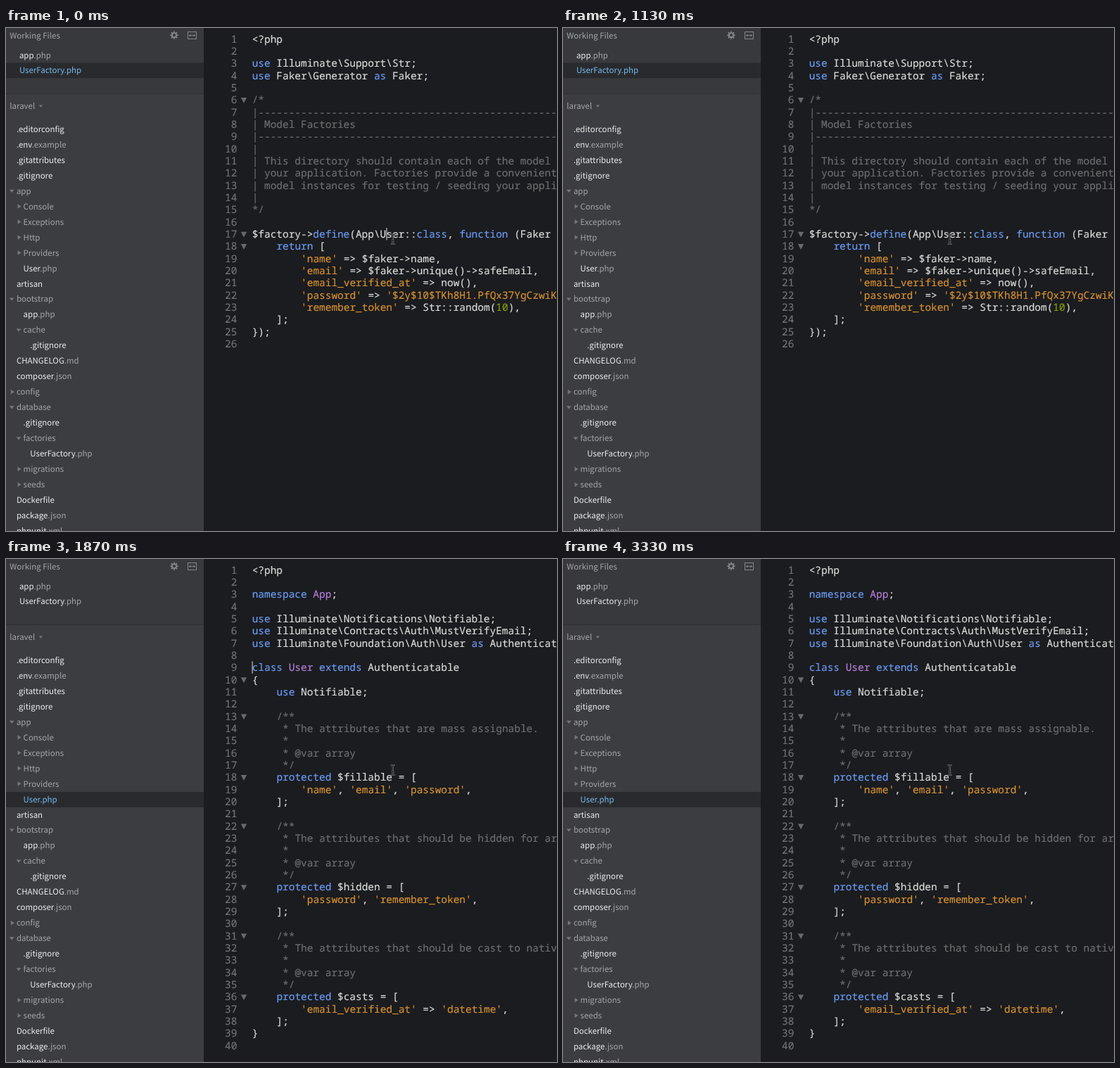
Animation of 783 by 715 pixels, one loop 3390 ms. Source, as an HTML page:

```html
<!DOCTYPE html>
<html lang="en">
<head>
<meta charset="utf-8">
<title>Code editor</title>
<style>
  html, body { margin: 0; width: 100%; height: 100%; overflow: hidden; background: #1b1c1f; }
  svg { display: block; width: 783px; height: 715px; overflow: hidden; }
  text { fill: currentColor; text-rendering: geometricPrecision; white-space: pre; }
  .ui { font-family: "Noto Sans CJK JP", "Noto Sans", sans-serif; color: #a3a6a9; }
  .code { font-family: "Noto Sans Mono", "DejaVu Sans Mono", monospace; font-weight: 500;
          font-variant-ligatures: none; color: #ddd; }
  .code text { stroke: currentColor; stroke-width: .15px; }
  .code .no { color: #737476; }
  .code tspan { fill: currentColor; stroke: currentColor; }
  .key { color: #6c9ef8; }
  .str { color: #d89333; }
  .num { color: #85a300; }
  .def { color: #b77fdb; }
  .rem { color: #6e6f71; }
  .file { color: #ececec; }
  .ext { fill: #a3a6a9; }
  .picked, .picked .ext { color: #74bbf0; fill: #74bbf0; }
  .tri { fill: #74777a; }
  .fold { fill: #67696b; }
</style>
</head>
<body>
<svg id="stage" viewBox="0 0 783 715"></svg>
<script>
const LOOP = 3390;
const CELL = 8.675, LINE = 17.34, CODE_X = 349.7, CODE_Y = 20.5;
const ROW = 21.97, TREE_Y = 147.8;

// [start, open file, selected row, caret shown]
const STEPS = [
  [0, 'factory', 'work', true],
  [130, 'factory', 'work', false],
  [600, 'factory', 'work', true],
  [1130, 'factory', 'work', false],
  [1800, 'user', '', true],
  [1870, 'user', 'tree', true],
  [2270, 'user', 'tree', false],
  [2800, 'user', 'tree', true],
  [3330, 'user', 'tree', false]
];

const FACTORY = String.raw`<?php

use Illuminate\Support\Str;
use Faker\Generator as Faker;

/*
|--------------------------------------------------------------------------
| Model Factories
|--------------------------------------------------------------------------
|
| This directory should contain each of the model factory definitions for
| your application. Factories provide a convenient way to generate new
| model instances for testing / seeding your application's database.
|
*/

$factory->define(App\User::class, function (Faker $faker) {
    return [
        'name' => $faker->name,
        'email' => $faker->unique()->safeEmail,
        'email_verified_at' => now(),
        'password' => '$2y$10$TKh8H1.PfQx37YgCzwiK',
        'remember_token' => Str::random(10),
    ];
});
`;

const USER = String.raw`<?php

namespace App;

use Illuminate\Notifications\Notifiable;
use Illuminate\Contracts\Auth\MustVerifyEmail;
use Illuminate\Foundation\Auth\User as Authenticatable;

class User extends Authenticatable
{
    use Notifiable;

    /**
     * The attributes that are mass assignable.
     *
     * @var array
     */
    protected $fillable = [
        'name', 'email', 'password',
    ];

    /**
     * The attributes that should be hidden for arrays.
     *
     * @var array
     */
    protected $hidden = [
        'password', 'remember_token',
    ];

    /**
     * The attributes that should be cast to native types.
     *
     * @var array
     */
    protected $casts = [
        'email_verified_at' => 'datetime',
    ];
}
`;

// Indent gives depth; "+" is a closed folder, "-" an open one.
const TREE = `.editorconfig
.env|.example
.gitattributes
.gitignore
-app
 +Console
 +Exceptions
 +Http
 +Providers
 User|.php
artisan
-bootstrap
 app|.php
 -cache
  .gitignore
CHANGELOG|.md
composer|.json
+config
-database
 .gitignore
 -factories
  UserFactory|.php
 +migrations
 +seeds
Dockerfile
package|.json
phpunit|.xml`.split('\n');

const stage = document.getElementById('stage');

function add(parent, tag, attrs = {}, content) {
  const node = document.createElementNS('http://www.w3.org/2000/svg', tag);
  for (const name in attrs) node.setAttribute(name, attrs[name]);
  if (content !== undefined) node.textContent = content;
  return parent.appendChild(node);
}

// Font size at which a digit has the given advance.
function sizeFor(family, advance) {
  const ctx = document.createElement('canvas').getContext('2d');
  ctx.font = `100px ${family}`;
  return 100 * advance / ctx.measureText('0').width;
}

function group(cls, advance) {
  const g = add(stage, 'g', { class: cls });
  g.style.fontSize = sizeFor(getComputedStyle(g).fontFamily, advance) + 'px';
  return g;
}

function fileLabel(parent, x, y, label) {
  const [base, ext] = label.split('|');
  const node = add(parent, 'text', { x, y, class: 'file' });
  add(node, 'tspan', {}, base);
  if (ext) add(node, 'tspan', { class: 'ext' }, ext);
  return node;
}

function drawTree(parent) {
  return TREE.map((entry, i) => {
    const [, indent, mark, label] = entry.match(/^( *)([+-]?)(.*)$/);
    const x = 14.9 + 9.7 * indent.length, y = TREE_Y + ROW * i;
    if (!mark) return fileLabel(parent, x, y, label);
    const d = mark === '+'
      ? `M${x - 8} ${y - 7.3}v6.4l5 -3.2z`
      : `M${x - 10} ${y - 6}h6.8l-3.4 4.4z`;
    add(parent, 'path', { d, class: 'tri' });
    return add(parent, 'text', { x, y }, label);
  });
}

const TOKEN = /('[^']*')|((?<=(?:namespace|class) )\w+)|\b(use|as|namespace|class|extends|protected|return|function|define)\b|\b(\d+)\b/g;
const KINDS = ['str', 'def', 'key', 'num'];

function highlight(node, line) {
  if (/^(\/\*|\*|\|)/.test(line)) {
    node.setAttribute('class', 'rem');
    node.textContent = line;
    return;
  }
  let at = 0;
  for (const m of line.matchAll(TOKEN)) {
    node.append(line.slice(at, m.index));
    const kind = KINDS[m.slice(1).findIndex(Boolean)];
    add(node, 'tspan', { class: kind }, m[0]);
    at = m.index + m[0].length;
  }
  node.append(line.slice(at));
}

function drawCode(source, caretLine, caretColumn) {
  const g = group('code', CELL);
  source.split('\n').forEach((line, i) => {
    const y = CODE_Y + LINE * i, body = line.trimStart();
    add(g, 'text', { x: 328.4, y, class: 'no', 'text-anchor': 'end' }, i + 1);
    if (/^\/\*|[[{]$/.test(body)) {
      add(g, 'path', { d: `M333.8 ${y - 8.2}h8.4l-4.2 7.8z`, class: 'fold' });
    }
    if (body) {
      const x = CODE_X + CELL * (line.length - body.length);
      highlight(add(g, 'text', { x, y }), body);
    }
  });
  const caret = add(g, 'rect', {
    x: CODE_X + CELL * caretColumn - .2, y: CODE_Y + LINE * (caretLine - 1) - 13.8,
    width: 1.2, height: 17.4, fill: '#c5c5c5'
  });
  return { g, caret };
}

function drawIcons() {
  const g = add(stage, 'g', { fill: 'none', stroke: '#85888b' });
  add(g, 'circle', { cx: 239, cy: 10.2, r: 3.1, 'stroke-width': 1.9 });
  add(g, 'circle', { cx: 239, cy: 10.2, r: 4.8, 'stroke-width': 1.7,
    pathLength: 16, 'stroke-dasharray': '1 1', 'stroke-dashoffset': .5 });
  add(g, 'rect', { x: 258.5, y: 5.5, width: 12, height: 10 });
  add(g, 'path', { d: 'M260.5 10.5h8M262.3 8.8l-1.7 1.7l1.7 1.7M266.7 8.8l1.7 1.7l-1.7 1.7' });
}

function drawPointer() {
  const d = 'M546.6 293q3.2 0 3.2 2q0 -2 3.2 -2M549.8 295v10M546.6 307q3.2 0 3.2 -2q0 2 3.2 2M547.8 302.5h4';
  add(stage, 'path', { d, fill: 'none', stroke: '#85878a', 'stroke-width': 2.1 });
  add(stage, 'path', { d, fill: 'none', stroke: '#18191b', 'stroke-width': 1 });
}

const files = {
  factory: drawCode(FACTORY, 17, 22),
  user: drawCode(USER, 9, 0)
};

add(stage, 'rect', { width: 281, height: 715, fill: '#3b3d41' });
add(stage, 'rect', { width: 281, height: 93, fill: '#37393d' });
const band = y => add(stage, 'rect', { y, width: 281, height: 21.8, fill: '#292a2d' });
const bands = { work: band(49.5), tree: band(331.2) };
add(stage, 'rect', { y: 93, width: 281, height: 1, fill: '#2d2f32' });

const ui = group('ui', 6.37);
add(ui, 'text', { x: 5.3, y: 15 }, 'Working Files');
fileLabel(ui, 18.9, 43.3, 'app|.php');
const labels = { work: fileLabel(ui, 18.9, 64.4, 'UserFactory|.php') };
add(ui, 'text', { x: 5.3, y: 115 }, 'laravel');
add(ui, 'path', { d: 'M46.8 109.6h5.2l-2.6 3.4z', class: 'tri' });
labels.tree = drawTree(ui)[9];
drawIcons();
drawPointer();

function show(node, on) {
  node.style.display = on ? '' : 'none';
}

function render(now) {
  const t = now % LOOP;
  const [, open, selected, caret] = STEPS.findLast(step => step[0] <= t);
  for (const name in files) {
    show(files[name].g, name === open);
    show(files[name].caret, caret);
  }
  for (const name in bands) {
    show(bands[name], name === selected);
    labels[name].classList.toggle('picked', name === selected);
  }
}

function frame() {
  render(performance.now());
  requestAnimationFrame(frame);
}
frame();
</script>
</body>
</html>
```
